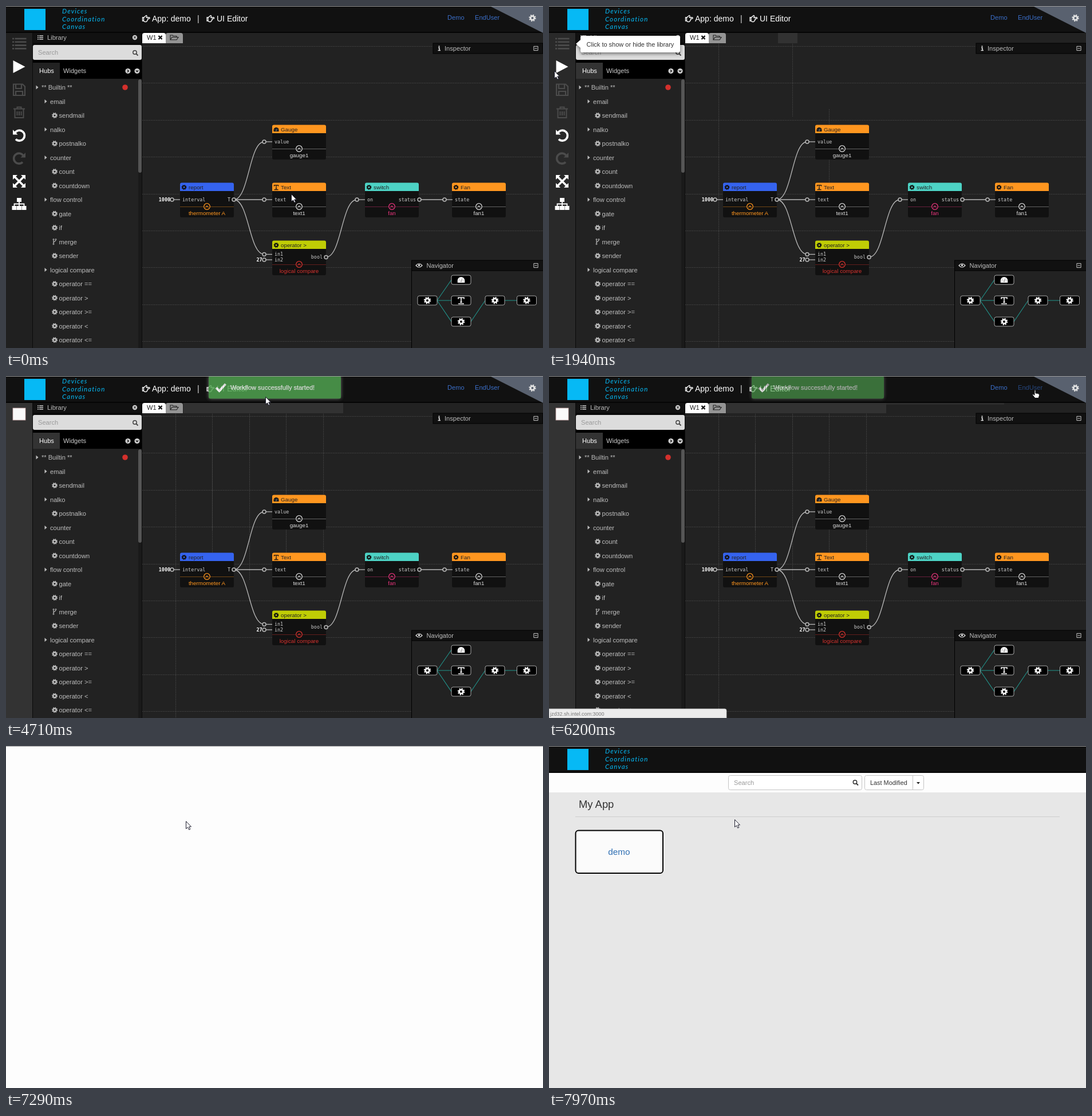
An HTML page that plays this animation: 938 by 597 pixels, repeating every 8 s.

```html
<!DOCTYPE html>
<html lang="en">
<head>
<meta charset="utf-8">
<title>Flow editor</title>
<style>
html, body { margin: 0; width: 100%; height: 100%; overflow: hidden; background: #fdfdfd; }
svg { display: block; width: 938px; height: 597px; }
text { font-family: "Liberation Sans", Arial, sans-serif; font-size: 11.1px; white-space: pre; }
.mono { font-family: "DejaVu Sans Mono", "Liberation Mono", monospace; font-size: 8.4px; }
.tag { font-family: Lato, sans-serif; font-style: italic; font-size: 11.5px; letter-spacing: 1.1px; fill: #06b9f5; }
.node { font-size: 9.8px; }
.dots { stroke: #555; stroke-dasharray: 1.5 1.5; }
.a .dots { stroke: #484848; }

/* every track shares one 8 s loop and changes hard */
.a { animation: 8s step-end infinite; }
.editor { animation-name: editor; }
@keyframes editor { 0% { opacity: 1 } 79.375% { opacity: 0 } }
.home { animation-name: home; }
@keyframes home { 0% { opacity: 0 } 95% { opacity: 1 } }
.apps { animation-name: apps; }
@keyframes apps { 0% { opacity: 0 } 97.25% { opacity: 1 } }
.idle { animation-name: idle; }
@keyframes idle { 0% { opacity: 1 } 38.375% { opacity: 0 } }
.running { animation-name: running; }
@keyframes running { 0% { opacity: 0 } 38.375% { opacity: 1 } }
.side { animation-name: side; }
@keyframes side { 0% { fill: #202020 } 24.25% { fill: #292929 } 38.375% { fill: #333 } }
.hubs { animation-name: hubs; }
@keyframes hubs { 0% { fill: #222 } 24.25% { fill: #333 } }
.tip { animation-name: tip; }
@keyframes tip { 0% { opacity: 0 } 22.625% { opacity: .6 } 24.25% { opacity: 1 } 26% { opacity: .4 } 27.875% { opacity: 0 } }
.toast { animation-name: toast; }
@keyframes toast { 0% { opacity: 0 } 38.375% { opacity: .4 } 39.875% { opacity: .85 } 76% { opacity: .8 } 77.5% { opacity: .66 } }
.status { animation-name: status; }
@keyframes status { 0% { opacity: 0 } 70.75% { opacity: 1 } }
.link { animation-name: link; }
@keyframes link { 0% { fill: #3b6fc9 } 70.75% { fill: #26477f } }
.rows { animation-name: rows; }
@keyframes rows { 0% { opacity: 0 } 34.75% { opacity: 1 } 39.875% { opacity: 0 } }
.g1 { animation-name: g1; }
@keyframes g1 { 0% { opacity: 0 } 14.5% { opacity: 1 } }
.g2 { animation-name: g2; }
@keyframes g2 { 0% { opacity: 0 } 19.375% { opacity: 1 } }
.g3 { animation-name: g3; }
@keyframes g3 { 0% { opacity: 0 } 34.75% { opacity: 1 } }
.g4 { animation-name: g4; }
@keyframes g4 { 0% { opacity: 0 } 39.875% { opacity: 1 } }
.g5 { animation-name: g5; }
@keyframes g5 { 0% { opacity: 0 } 65.5% { opacity: 1 } }
.arrow { animation-name: arrow; }
@keyframes arrow { 0% { opacity: 1 } 70.75% { opacity: 0 } 79.375% { opacity: 1 } }
.hand { animation-name: hand; }
@keyframes hand { 0% { opacity: 0 } 70.75% { opacity: 1 } 79.375% { opacity: 0 } }
.pos { animation-name: pos; }
@keyframes pos {
  0% { transform: translate(498px, 328px) }
  6.25% { transform: translate(497px, 318px) }
  8% { transform: translate(494px, 285px) }
  9.625% { transform: translate(490px, 240px) }
  11.25% { transform: translate(484px, 185px) }
  12.875% { transform: translate(462px, 120px) }
  14.5% { transform: translate(430px, 70px) }
  16.25% { transform: translate(405px, 38px) }
  17.875% { transform: translate(389px, 27px) }
  19.375% { transform: translate(340px, 32px) }
  21% { transform: translate(190px, 50px) }
  22.625% { transform: translate(50px, 66px) }
  24.25% { transform: translate(9px, 113px) }
  26% { transform: translate(14px, 108px) }
  27.875% { transform: translate(16px, 105px) }
  31.5% { transform: translate(130px, 135px) }
  34.75% { transform: translate(320px, 210px) }
  36.5% { transform: translate(463px, 257px) }
  38.375% { transform: translate(463px, 268px) }
  52% { transform: translate(462px, 250px) }
  53.75% { transform: translate(460px, 200px) }
  55.375% { transform: translate(457px, 130px) }
  57% { transform: translate(454px, 70px) }
  58.875% { transform: translate(453px, 36px) }
  60.625% { transform: translate(520px, 30px) }
  62.125% { transform: translate(650px, 24px) }
  63.625% { transform: translate(784px, 22px) }
  65.5% { transform: translate(815px, 19px) }
  67.25% { transform: translate(840px, 20px) }
  69% { transform: translate(862px, 23px) }
  70.75% { transform: translate(852px, 24px) }
  72.625% { transform: translate(848px, 24px) }
  79.375% { transform: translate(845px, 24px) }
  84.375% { transform: translate(838px, 19px) }
  86% { transform: translate(720px, 40px) }
  87.75% { transform: translate(520px, 85px) }
  89.5% { transform: translate(370px, 120px) }
  91.125%, 97.25% { transform: translate(314px, 131px) }
  99.625%, 100% { transform: translate(324px, 128px) }
}
</style>
</head>
<body>
<svg id="stage" viewBox="0 0 938 597" xmlns="http://www.w3.org/2000/svg"></svg>
<script>
const rect = (x, y, w, h, fill, more = '') => `<rect x="${x}" y="${y}" width="${w}" height="${h}" fill="${fill}" ${more}/>`;
const text = (x, y, s, fill, more = '') => `<text x="${x}" y="${y}" fill="${fill}" ${more}>${s.replace(/</g, '&lt;')}</text>`;
const line = (d, color, w = 1, more = '') => `<path d="${d}" fill="none" stroke="${color}" stroke-width="${w}" ${more}/>`;
const fill = (d, color, more = '') => `<path d="${d}" fill="${color}" ${more}/>`;
const ring = (x, y, r, color, w = 1.3, inner = 'none') => `<circle cx="${x}" cy="${y}" r="${r}" fill="${inner}" stroke="${color}" stroke-width="${w}"/>`;
const icon = (id, x, y, color, k = 1) => `<use href="#${id}" transform="translate(${x} ${y}) scale(${k})" color="${color}"/>`;
const group = (cls, body) => `<g class="${cls}">${body}</g>`;
const mid = 'text-anchor="middle"', cc = 'currentColor';

const defs = `<defs>
  <g id="gear">${ring(0, 0, 2.7, cc, 2.2)}<circle r="4.2" fill="none" stroke="${cc}" stroke-width="1.6" stroke-dasharray="1.65"/></g>
  <g id="tee">${line('M-4-2V-4H4V-2M0-4V2.6M-1.5 2.6H1.5M-4 4.6H4', cc, 1.3)}</g>
  <g id="dial">${fill('M-5 4V1A5 5 0 0 1 5 1V4Z', cc)}${line('M0 2L1.5-2M-3.4 1H-2.2M2.2 1H3.4M-2.4-1.6L-1.6-.8', 'var(--hole)', .9)}${ring(0, 2, .8, 'var(--hole)', .8)}</g>
  <g id="branch">${line('M-2-3V3M2-3C2 0-2-1-2 2', cc, 1.1)}${ring(-2, -4, 1, cc, 1)}${ring(2, -4, 1, cc, 1)}${ring(-2, 4, 1, cc, 1)}</g>
  <g id="point">${line('M-6-2H-4V4H-6ZM-4-2C-2-2.5-1-5 .5-5.5C2-5.5 1.5-3 .8-2H5.5C7-2 7 .2 5.5.2H2.5M3 .2C4 1 3.5 2 2.5 2.2C3 3.2 2.4 4 1.5 4.1C1.6 5 1 5.5 0 5.5H-1.5C-3 5.5-3 4.5-4 4', cc, 1.3)}</g>
  <g id="find">${ring(-1, -1, 3.2, cc, 1.5)}${line('M1.4 1.4L4.5 4.5', cc, 1.9)}</g>
  <g id="fold">${line('M-4-4H4V4H-4ZM-2.3 0H2.3', cc, 1.1)}</g>
  <g id="list">${line('M-5-3.5H-3M-5-.5H-3M-5 2.5H-3M-2-3.5H5M-2-.5H5M-2 2.5H5', cc, 1.5)}</g>
  <g id="turn">${line('M-7-5A9 9 0 1 1-6 6.5', cc, 3.6)}${fill('M-11-10V-1.5H-2.5Z', cc)}</g>
</defs>`;

const logo = () => rect(32, 5, 37, 37, '#06b9f5')
  + ['Devices', 'Coordination', 'Canvas'].map((s, i) => text(98, 13 + 13.7 * i, s, '', 'class="tag"')).join('');

function header() {
  return rect(0, 0, 938, 47, '#111') + rect(0, 45, 938, 2, '#050505') + logo()
    + icon('point', 244.5, 22, '#fff') + text(255, 27, 'App: demo', '#fff', 'style="font-size:14px"')
    + text(334, 27, '|', '#ddd', 'style="font-size:14px"')
    + icon('point', 357, 22, '#fff') + text(368, 27, 'UI Editor', '#fff', 'style="font-size:14px"')
    + text(771, 24, 'Demo', '#3b6fc9') + text(819, 24, 'EndUser', '#3b6fc9', 'class="a link"')
    + fill('M845 0H938V47Z', '#59616f') + icon('gear', 919.5, 21, '#e2e2e2', 1.25);
}

function sidebar() {
  const dim = '#4b4b4b', on = '#fff';
  let bars = '';
  for (let y = 57; y < 78; y += 5.8) bars += `M11 ${y}H14M15.500 ${y}H35.500`;
  const idle = line(bars, dim, 2.6)
    + fill('M12.500 95L33.500 106L12.500 117Z', on)
    + line('M13 136.500H29L33 140.500V156H13ZM17 137V144H27V137M17 156V149H29V156', dim, 2.2)
    + line('M13 179.500H33M15.500 180V195H30.500V180M19.500 179V176.500H26.500V179M19.500 184V191M23 184V191M26.500 184V191', dim, 2)
    + icon('turn', 23, 226, on) + `<g transform="matrix(-1 0 0 1 23 266)" color="${dim}"><use href="#turn"/></g>`
    + line('M15 298L31 314M31 298L15 314', on, 3.6)
    + fill('M12 295H20L12 303ZM34 295V303L26 295ZM12 317V309L20 317ZM34 317H26L34 309Z', on)
    + rect(19, 335, 8, 7, on) + [10.5, 19, 27.5].map(x => rect(x, 349, 8, 7, on)).join('')
    + line('M23 342V349M14.500 349V345.500H31.500V349', on, 1.8);
  return rect(0, 47, 46, 550, '#202020', 'class="a side"') + group('a idle', idle)
    + group('a running', rect(12, 56, 22, 21, '#fafafa', 'stroke="#c9a5a5" stroke-width=".8"'));
}

function library() {
  const names = ['-** Builtin **', '>email', 'sendmail', '>nalko', 'postnalko', '>counter', 'count', 'countdown', '>flow control',
    'gate', 'if', 'merge', 'sender', '>logical compare', 'operator ==', 'operator >', 'operator >=', 'operator <', 'operator <='];
  const ink = '#bdbdbd';
  let s = rect(46, 47, 192, 550, '#0a0a0a') + rect(47, 47, 190, 17, '#111')
    + icon('list', 60, 55.5, '#ccc') + text(72, 59, 'Library', ink)
    + ring(225, 55, 4.2, '#ccc', 0, '#ccc') + line('M223.500 53.500L226.500 56.500M226.500 53.500L223.500 56.500', '#111', 1.2)
    + rect(47, 68, 190, 26, '#dcdcdc', 'rx="3"') + text(56, 85, 'Search', '#999') + icon('find', 226, 82, '#444')
    + rect(47, 94, 190, 33, '#000') + rect(47, 99, 47, 28, '#222', 'class="a hubs"') + rect(47, 127, 190, 470, '#222')
    + text(58, 117, 'Hubs', '#fff') + text(100, 117, 'Widgets', '#ccc');
  for (const [x, d] of [[213, 'M-1-2L1.200 0L-1 2'], [229, 'M-2-1L0 1.200L2-1']])
    s += ring(x, 113.5, 4.6, '#ccc', 0, '#ccc') + line(d, '#111', 1.4, `transform="translate(${x} 113.5)"`);
  s += group('a rows', rect(130, 131, 101, 22, '#292929') + rect(130, 155, 101, 23, '#303030')
    + rect(130, 204, 101, 23, '#2b2b2b') + rect(130, 253, 101, 18, '#2a2a2a'));
  names.forEach((name, i) => {
    const y = 142 + 24.5 * i, root = name[0] === '-', top = root || (name[0] === '>');
    if (top) s += fill('M0-3.500L4 0L0 3.500Z', ink, `transform="translate(${root ? 52.5 : 67.5} ${y})"`);
    else s += icon(name === 'merge' ? 'branch' : 'gear', 85, y, ink);
    s += text(root ? 62 : top ? 77 : 92.5, y + 4, top ? name.slice(1) : name, ink);
  });
  return s + ring(208, 142, 4.8, '#d4302c', 0, '#d4302c') + rect(231, 127, 6, 470, '#1a1a1a') + rect(231, 128, 6, 163, '#555', 'rx="3"')
    + rect(47, 588, 184, 9, '#222');
}

function canvas() {
  let rows = '';
  for (let i = 0; i < 9; i++) rows += `M238 ${Math.round(71 + 64.4 * i) - .5}H938`;
  const v = d => `<path class="dots" d="${d}"/>`, strip = (x, w) => rect(x, 47, w, 18, '#323232');
  return rect(238, 47, 700, 550, '#222') + `<path class="dots" d="${rows}"/>`
    + group('a g1', strip(400, 34) + v('M425.500 66V193M489.500 180V310'))
    + group('a g2', v('M296.500 66V597')) + group('a g3', v('M360.500 118V270'))
    + group('a g4', strip(310, 279) + v('M360.500 66V356M425.500 66V356M489.500 66V356M554.500 66V356'))
    + group('a g5', rect(589, 47, 206, 3, '#2d2d2d'))
    + fill('M238 65V51Q238 47 242 47H275Q279 47 279 51V65Z', '#fff')
    + text(246, 59, 'W1', '#222') + line('M266.500 52L272.500 58M272.500 52L266.500 58', '#111', 2.4)
    + fill('M279 65V51Q279 47 283 47H305Q309 47 309 51V65Z', '#949494')
    + line('M287 58.500V51H291L292 52.500H298V54.500M287 59L290 54.500H301L298 59Z', '#222', 1.1);
}

function node(x, y, kind, title, color, label, tint = '#ddd') {
  return rect(x, y, 94, 60, '#111', 'rx="3"')
    + fill(`M${x} ${y + 14}V${y + 2.5}q0-3 3-3H${x + 91}q3 0 3 3V${y + 14}Z`, color)
    + icon(kind, x + 7, y + 7.5, '#111', .9) + text(x + 15, y + 11, title, '#222', 'class="node"')
    + line(`M${x} ${y + 41.5}H${x + 94}`, tint, 1, 'opacity=".4"') + ring(x + 47, y + 41, 5.3, tint, 1.3, '#111')
    + line(`M${x + 44.5} ${y + 42.5}l2.500-2.500l2.500 2.500`, tint, 1.2)
    + text(x + 47, y + 56, label, tint, `class="node" ${mid}`);
}

function flow() {
  const ink = '#b8b8b8', orange = '#ff961f';
  const wire = (x, y, x2, y2) => line(`M${x} ${y}C${(x + x2) / 2} ${y} ${(x + x2) / 2} ${y2} ${x2} ${y2}`, ink, 1.3);
  const port = (x, y) => ring(x, y, 3, ink, 1.5, '#222');
  const input = (x, y, name) => line(`M${x - 14} ${y}H${x}`, ink, 1.3) + port(x - 14, y) + text(x + 4, y + 2.5, name, '#ccc', 'class="mono"');
  const output = (x, y, name) => port(x, y) + text(x - 6, y + 2.5, name, '#ccc', 'class="mono" text-anchor="end"');
  const value = (x, y, s) => text(x, y, s, '#fff', 'class="mono" font-weight="bold" text-anchor="end"');
  return wire(398, 338, 451, 237) + wire(398, 338, 451, 338) + wire(398, 338, 451, 433.5)
    + wire(559, 438.5, 613, 338) + wire(722, 338, 766, 338)
    + node(465, 208, 'dial', 'Gauge', orange, 'gauge1') + node(465, 309, 'tee', 'Text', orange, 'text1')
    + node(465, 410, 'gear', 'operator >', '#c0cd05', 'logical compare', '#d9332f')
    + node(304, 309, 'gear', 'report', '#3563ee', 'thermometer A', orange)
    + node(627, 309, 'gear', 'switch', '#4dd3c5', 'fan', '#e8357d') + node(779, 309, 'gear', 'Fan', orange, 'fan1')
    + input(465, 237, 'value') + input(465, 338, 'text') + input(465, 433.5, 'in1') + input(465, 443, 'in2')
    + input(304, 338, 'interval') + input(627, 338, 'on') + input(780, 338, 'state')
    + output(398, 338, 'T') + output(559, 438.5, 'bool') + output(722, 338, 'status')
    + value(287, 340.5, '1000') + value(447.5, 445.5, '27');
}

function panels() {
  const bar = (x, y, w, name) => rect(x, y, w, 18, '#111', 'stroke="#000"') + icon('fold', 925.5, y + 9, '#ccc', .9)
    + text(x + (w < 200 ? 20 : 26), y + 12.5, name, '#bdbdbd');
  let s = bar(746, 65, 192, 'Inspector') + line('M755 73H757V77.500M754.500 77.500H759', '#ddd', 1.6) + rect(755.5, 69.5, 2, 2, '#ddd')
    + rect(708.5, 444.5, 230, 153, '#222', 'stroke="#000"') + bar(708.5, 444, 230, 'Navigator')
    + line('M716 453Q721.500 446.500 727 453Q721.500 459 716 453Z', '#ddd', 1.2) + ring(721.5, 452.5, 1.8, '#ddd', 0, '#ddd')
    + line('M753 514L778 478M753 514H778M753 514L778 551M812 551L837 514M871 514H892', '#21958c', 1.1);
  for (const [x, y, id] of [[736, 514, 'gear'], [795, 478, 'dial'], [795, 514, 'tee'], [795, 551, 'gear'], [854, 514, 'gear'], [909.5, 514, 'gear']])
    s += rect(x - 17, y - 8, 34, 16, '#000', 'rx="3" stroke="#aaa"') + icon(id, x, y, '#fff', 1.25);
  return s;
}

const tip = group('a tip', `<g style="filter:drop-shadow(0 2px 3px #0008)">${fill('M47 66L55 59V55Q55 52 58 52H226Q229 52 229 55V78Q229 81 226 81H58Q55 81 55 78V73Z', '#fff')}</g>`
  + text(65.5, 71, 'Click to show or hide the library', '#333', 'style="font-size:11px"'));
const toast = group('a toast', rect(354, 0, 231, 39.5, '#51a351', 'rx="3" style="filter:drop-shadow(0 0 3px #777)"')
  + line('M367 20.500L372.500 26L383.500 14', '#fff', 4) + text(392, 24, 'Workflow successfully started!', '#fff', 'style="font-size:11px" stroke="#fff" stroke-width=".25"'));
const status = group('a status', fill('M0 581H307Q310 581 310 584V597H0Z', '#ececec', 'stroke="#bbb" stroke-width=".8"')
  + text(2, 593, 'jzd32.sh.intel.com:3000', '#777', 'style="font-size:9px"'));

function home() {
  const box = 'rx="3" stroke="#c4c4c4"';
  const apps = text(52, 108, 'My App', '#333', 'style="font-size:18.4px"') + line('M46 123.500H892', '#cdcdcd')
    + rect(46.500, 147.500, 152.500, 74.500, '#fbfbfb', 'rx="5" stroke="#000" stroke-width="2"')
    + text(122.5, 190, 'demo', '#2f6fb3', `style="font-size:15.3px" ${mid}`);
  return rect(0, 0, 938, 597, '#e7e7e7') + rect(0, 0, 938, 47, '#111') + rect(0, 45, 938, 2, '#050505') + logo()
    + rect(0, 47, 938, 34, '#fdfdfd') + rect(313.5, 51.5, 233, 25, '#fff', box)
    + text(323, 67.5, 'Search', '#999') + icon('find', 535.5, 64, '#333')
    + rect(551.5, 51.5, 103, 25, '#fff', box) + line('M635.500 52V76', '#c4c4c4')
    + text(561, 67.5, 'Last Modified', '#333', 'style="font-size:10.9px"') + fill('M642 63H648L645 66.500Z', '#222')
    + group('a apps', apps);
}

const cursor = group('a pos',
  fill('M.5.5V13.500L3.500 10.800L5.700 15.200L7.800 14.200L5.700 9.900H9.500Z', '#fff', 'class="a arrow" stroke="#1c1c2c"')
  + fill('M0 1Q1-.5 2 1V6L6 6.500Q9 7 8.500 10L7 14.500H1L-3.500 9Q-3.500 7-1.500 8L0 9.500Z', '#fff', 'class="a hand" stroke="#111"'));

const stage = document.getElementById('stage');
stage.style.setProperty('--hole', '#999');
stage.innerHTML = defs + rect(0, 0, 938, 597, '#fdfdfd')
  + group('a editor', canvas() + flow() + panels() + library() + sidebar() + header() + tip + toast + status)
  + group('a home', home()) + rect(0, 0, 938, 1, '#999') + cursor;
</script>
</body>
</html>
```
